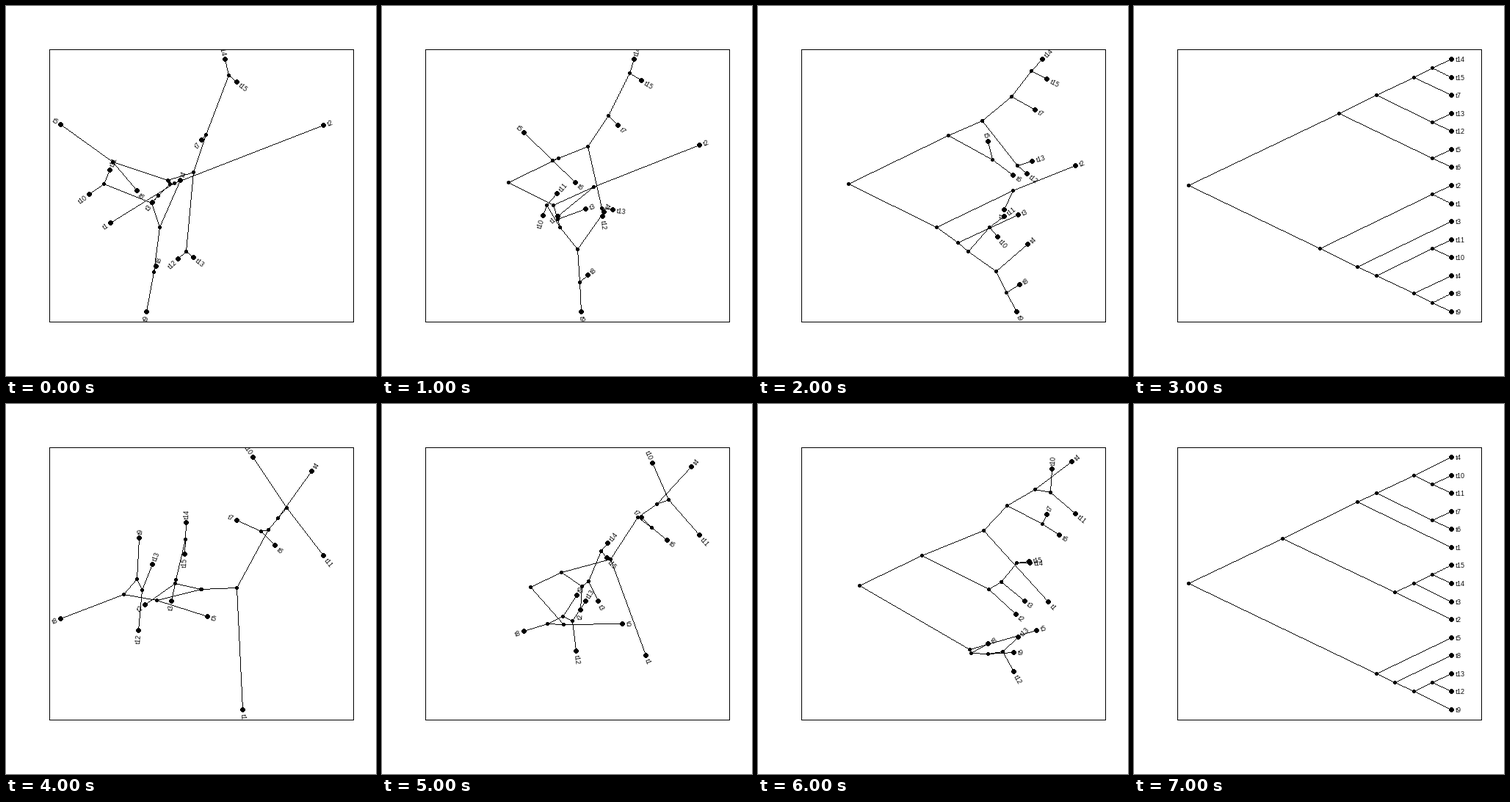
A matplotlib script that plays this animation: 504x504 px, repeating every 8000 ms.

```python
import math

import matplotlib.pyplot as plt
import numpy as np
from matplotlib.animation import FuncAnimation
from matplotlib.patches import Rectangle

# crisp, pixel-fitted small type
plt.rcParams["text.hinting"] = "native"
plt.rcParams["text.hinting_factor"] = 1

SIZE = 504
LEFT, TOP, RIGHT, BOTTOM = 59, 59, 473, 430
X0, X1, Y0, Y1 = 74, 432, 72, 416    # extent shared by both layouts
STEPS = 4                            # frames from scatter to cladogram

# Starting layout: a tip is (x, y, label), a fork is (x, y, (child, child)).
TREE_A = (221, 238, (
    (220, 237, (
        (255, 226, (
            (272, 175, (
                (303, 94, ((298, 72, "t14"), (314, 103, "t15"))),
                (266, 182, "t7"))),
            (245, 334, ((255, 342, "t13"), (234, 344, "t12"))))),
        (145, 212, ((74, 161, "t5"), (178, 251, "t6"))))),
    (223, 242, (
        (229, 241, ((432, 162, "t2"), (142, 295, "t1"))),
        (207, 258, (
            (199, 267, "t3"),
            (198, 268, (
                (133, 242, ((141, 223, "t11"), (113, 256, "t10"))),
                (209, 301, (
                    (237, 237, "t4"),
                    (201, 362, ((204, 354, "t8"), (191, 416, "t9")))))))))))))

TREE_B = (266, 252, (
    (265, 252, (
        (314, 250, (
            (357, 171, (
                (370, 155, (
                    (416, 91, "t4"),
                    (382, 141, ((336, 72, "t10"), (432, 206, "t11"))))),
                (347, 173, ((314, 158, "t7"), (366, 192, "t6"))))),
            (322, 416, "t1"))),
        (230, 244, (
            (231, 239, (
                (244, 184, ((243, 204, "t15"), (245, 161, "t14"))),
                (225, 268, "t3"))),
            (189, 273, "t2"))))),
    (205, 267, (
        (274, 289, "t5"),
        (160, 259, (
            (74, 292, "t8"),
            (178, 238, (
                (185, 253, ((199, 218, "t13"), (180, 308, "t12"))),
                (181, 182, "t9")))))))))


def count_tips(node):
    kids = node[2]
    return 1 if isinstance(kids, str) else sum(map(count_tips, kids))


def flatten(root):
    """List each node as (start, end, parent index, label)."""
    total = count_tips(root)
    nodes = []

    def visit(node, first, parent):
        x, y, kids = node
        span = count_tips(node) - 1
        end = (X1 - (X1 - X0) * span / (total - 1),
               Y0 + (Y1 - Y0) * (first + span / 2) / (total - 1))
        index = len(nodes)
        is_tip = isinstance(kids, str)
        nodes.append(((x, y), end, parent, kids if is_tip else None))
        if not is_tip:
            for kid in kids:
                visit(kid, first, index)
                first += count_tips(kid)

    visit(root, 0, None)
    return nodes


TREES = [flatten(TREE_A), flatten(TREE_B)]

fig = plt.figure(figsize=(SIZE / 72, SIZE / 72), dpi=72, facecolor="white")
ax = fig.add_axes([0, 0, 1, 1])
ax.axis("off")
canvas = np.ones((SIZE, SIZE))
picture = ax.imshow(canvas, cmap="gray", vmin=0, vmax=1, aspect="auto",
                    interpolation="nearest", extent=(0, SIZE, SIZE, 0))
window = Rectangle((LEFT, TOP), RIGHT - LEFT + 1, BOTTOM - TOP + 1,
                   transform=ax.transData)


def draw_edge(p, q):
    """One-pixel line without smoothing."""
    n = max(abs(q[0] - p[0]), abs(q[1] - p[1])) + 1
    xs = np.rint(np.linspace(p[0], q[0], n)).astype(int)
    ys = np.rint(np.linspace(p[1], q[1], n)).astype(int)
    canvas[ys, xs] = 0


def draw_dot(p, radius):
    dy, dx = np.mgrid[-radius:radius + 1, -radius:radius + 1]
    inside = dx**2 + dy**2 <= radius * (radius + 0.5)
    canvas[p[1] + dy[inside], p[0] + dx[inside]] = 0


def draw_label(text, tip, parent, flat):
    if flat:
        side, angle, gap = 1, 0, 5.5
    else:
        dx, dy = tip[0] - parent[0], parent[1] - tip[1]
        side = 1 if dx > 0 else -1
        angle, gap = math.atan2(dy * side, dx * side), 5
    c, s = math.cos(angle), math.sin(angle)
    drop = 3.5    # from the text's middle down to its baseline
    label = ax.text(tip[0] + 0.5 + side * gap * c + drop * s,
                    tip[1] + 0.5 - side * gap * s + drop * c,
                    text, fontname="Liberation Sans", fontsize=9,
                    color="black", rotation=math.degrees(angle),
                    rotation_mode="anchor", va="baseline",
                    ha="left" if side > 0 else "right", clip_on=True)
    label.set_clip_path(window)


def draw(frame):
    for label in list(ax.texts):
        label.remove()
    canvas[:] = 1
    canvas[[TOP, BOTTOM], LEFT:RIGHT + 1] = 0
    canvas[TOP:BOTTOM + 1, [LEFT, RIGHT]] = 0

    which, step = divmod(frame, STEPS)
    nodes = TREES[which]
    t = step / (STEPS - 1)
    pos = [tuple(round(a + (b - a) * t) for a, b in zip(start, end))
           for start, end, _, _ in nodes]

    for p, (_, _, parent, label) in zip(pos, nodes):
        if parent is not None:
            draw_edge(pos[parent], p)
        draw_dot(p, 3 if label else 2)
        if label:
            draw_label(label, p, pos[parent], step == STEPS - 1)
    picture.set_data(canvas)
    return [picture]


anim = FuncAnimation(fig, draw, frames=STEPS * len(TREES), interval=1000,
                     init_func=lambda: [], repeat=True, repeat_delay=0,
                     blit=False)
plt.show()
```
